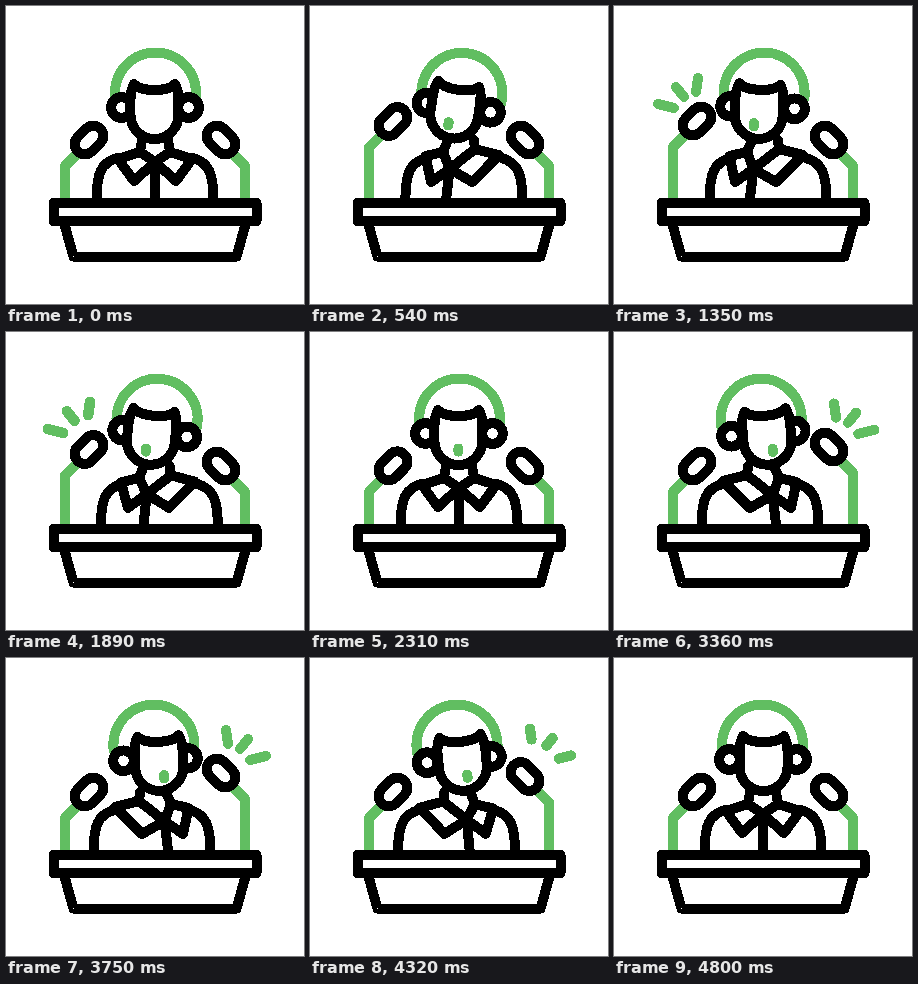
Animation, 298 px wide and 298 px high, one loop 5400 ms. Source, as an HTML page:

```html
<!DOCTYPE html>
<html lang="en">
<head>
<meta charset="utf-8">
<title>Speaker at a podium</title>
<style>
  html, body { margin: 0; width: 100%; height: 100%; overflow: hidden; background: #fff; }
  svg { display: block; width: 100vw; height: 100vh; shape-rendering: crispEdges; }
  .ink, .leaf { fill: none; stroke-width: 10; stroke-linecap: round; stroke-linejoin: round; }
  .ink { stroke: #000; }
  .leaf { stroke: #61be61; }
  .solid { fill: #fff; }
</style>
</head>
<body>
<svg viewBox="0 0 298 298">
  <g id="scene">
    <g id="nearMic">
      <path class="leaf" d="M71 148 59 160V225"/>
      <rect class="ink solid" x="67" y="124" width="32" height="20" rx="9.5" transform="rotate(-45 83 134)"/>
    </g>
    <g>
      <path class="leaf" d="M227 148 239 160V200"/>
      <rect class="ink solid" x="199" y="124" width="32" height="20" rx="9.5" transform="rotate(45 215 134)"/>
    </g>
    <path id="burst" class="leaf"/>

    <path id="shoulders" class="ink" d="M90.5 200V192C91 167 95 157 111 152M207.5 200V192C207 167 203 157 187 152"/>
    <path id="shirt" class="ink"/>
    <path id="collar" class="ink solid"/>

    <g id="head">
      <path class="leaf" d="M109 91V87A40.5 40.5 0 0 1 190 87V91"/>
      <circle id="earL" class="ink solid" cx="115.5" cy="101.5" r="10.3"/>
      <circle id="earR" class="ink solid" cx="182.5" cy="101.5" r="10.3"/>
      <path id="face" class="ink solid" d="M128 78Q124.5 85 124.5 93V109A24 24 0 0 0 172.5 109V93Q172.5 85 169 78C163 86 134 86 128 78Z"/>
      <rect id="mouth" x="-5" y="-6.5" width="10" height="13" rx="4.6" fill="#61be61"/>
    </g>

    <rect x="40" y="196" width="218" height="70" fill="#fff"/>
    <path class="ink" d="M57.5 215 67.5 250.5H230.5L240.5 215"/>
    <rect class="ink solid" x="47.5" y="197" width="203" height="18"/>
  </g>
</svg>
<script>
  const LOOP = 5400, HALF = 2400;
  const parts = {};
  document.querySelectorAll('[id]').forEach(e => parts[e.id] = e);

  const ramp = (t, a, b) => Math.min(1, Math.max(0, (t - a) / (b - a)));
  const ease = x => (1 - Math.cos(Math.PI * x)) / 2;
  const move = (name, value) => parts[name].setAttribute('transform', value);
  const draw = (name, d) => parts[name].setAttribute('d', d);

  // Eased value through [time, value] stops
  function track(t, stops) {
    let value = stops[0][1];
    for (let i = 1; i < stops.length; i++) {
      const [a, from] = stops[i - 1], [b, to] = stops[i];
      value += (to - from) * ease(ramp(t, a, b));
    }
    return value;
  }

  // Each point: facing forward x, y, then turned x, y
  const clothes = {
    neckL: [136, 134, 138, 134],
    baseL: [134, 146, 133, 146],
    tipL: [112, 153, 115.5, 150],
    cornerL: [128, 175, 121, 176],
    knot: [149, 156, 139.5, 163],
    neckR: [162, 134, 164, 134],
    baseR: [164, 146, 165, 143],
    tipR: [186, 153, 189, 149],
    cornerR: [170, 175, 162, 176],
    hem: [149, 200, 135, 200]
  };

  const rays = [[60, 102, 44, 98], [70, 91, 62, 81], [82, 86, 84, 72]];
  const tilts = [[0, 0], [570, 8.5], [1290, 2], [1740, 7], [2340, 0]];

  function dress(turn) {
    const p = {};
    for (const name in clothes) {
      const [x, y, tx, ty] = clothes[name];
      p[name] = `${x + (tx - x) * turn} ${y + (ty - y) * turn} `;
    }
    draw('shirt', `M${p.neckL}L${p.baseL}M${p.neckR}L${p.baseR}M${p.knot}L${p.hem}`);
    draw('collar', ['L', 'R'].map(s =>
      `M${p['base' + s]}L${p['tip' + s]}L${p['corner' + s]}L${p.knot}Z`).join(''));
  }

  function shout(t, shift) {
    const grow = ease(ramp(t, 660, 900)), fade = ease(ramp(t, 1850, 2060));
    parts.burst.style.display = grow > 0 && fade < 1 ? '' : 'none';
    const pulse = 1 + 0.065 * Math.cos((t - 1050) / 400 * 2 * Math.PI);
    move('burst', `translate(${83 + shift} 115) scale(${pulse}) translate(-83 -115)`);
    draw('burst', rays.map(([x, y, x2, y2]) => {
      const at = k => `${x + (x2 - x) * k} ${y + (y2 - y) * k}`;
      return `M${at(fade)}L${at(grow)}`;
    }).join(''));
  }

  function render(now) {
    const time = now % LOOP;
    const mirrored = time >= HALF;
    const t = mirrored ? time - HALF : time;
    const turn = ease(ramp(t, 0, 600)) - ease(ramp(t, 1750, 2350));

    move('scene', mirrored ? 'translate(298 0) scale(-1 1)' : '');
    move('nearMic', `translate(0 ${-19 * turn})`);
    move('shoulders', `translate(${(mirrored ? 3 : 5) * turn} 0)`);
    dress(turn);
    shout(t, mirrored ? -6 : 0);

    move('head', `rotate(${track(t, tilts)} 148 103)`);
    move('earL', `translate(${turn} 0)`);
    move('earR', `translate(${-2 * turn} 0)`);
    move('face', `translate(${-3.5 * turn} 0)`);
    const open = ease(ramp(time, 60, 300)) - ease(ramp(time, 4500, 4770));
    move('mouth', `translate(${148.5 - 8 * turn} ${118 + turn}) scale(${open})`);

    requestAnimationFrame(tick);
  }

  const start = performance.now();
  function tick() { render(performance.now() - start); }
  tick();
</script>
</body>
</html>
```
